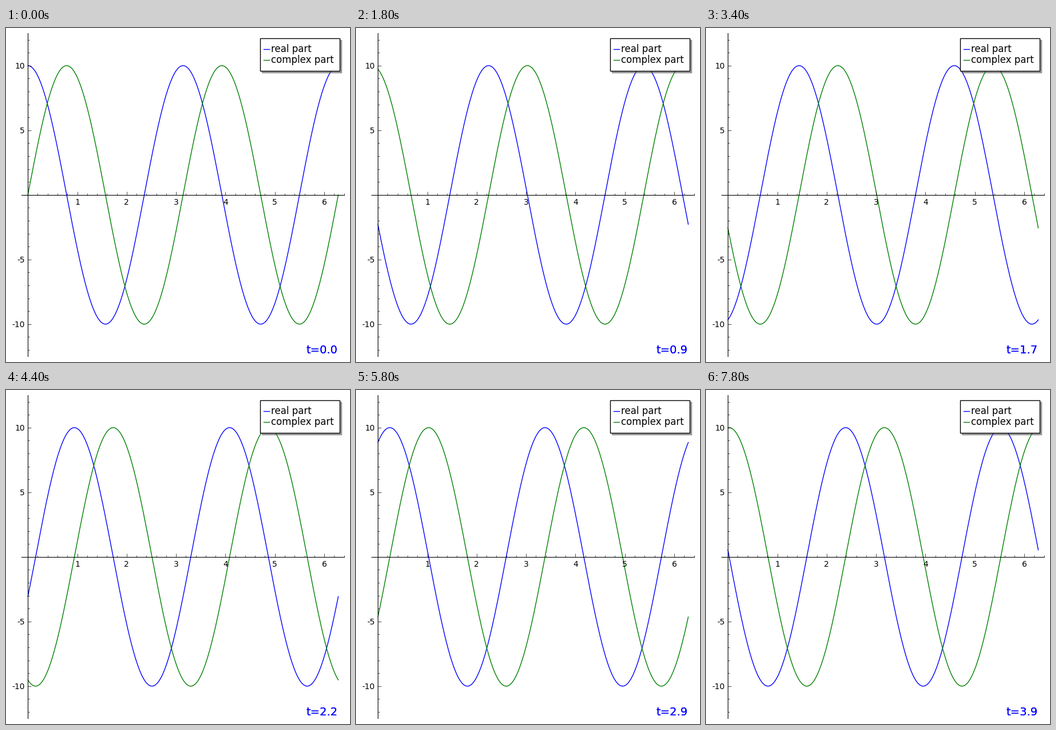
A matplotlib script for the animation above (8000 ms loop, 601 px wide and 584 px high).

```python
import numpy as np
import matplotlib.pyplot as plt
from matplotlib.animation import FuncAnimation
from matplotlib.lines import Line2D
from matplotlib.patches import Rectangle

W, H, DPI = 601, 584, 100
FRAMES, INTERVAL = 40, 200
BLUE, GREEN = (0, 0, 1), (0, 0.5, 0)

plt.rcParams.update({
    "font.family": "DejaVu Sans",
    "font.size": 10,
    "axes.unicode_minus": False,
    "axes.axisbelow": False,
})

fig = plt.figure(figsize=(W / DPI, H / DPI), dpi=DPI, facecolor="white")

# Plot area in pixels: left, top, width, height
LEFT, TOP, AW, AH = 27.35, 9.3, 564, 565
ax = fig.add_axes([LEFT / W, 1 - (TOP + AH) / H, AW / W, AH / H])
END = 2 * np.pi
ax.set_xlim(-0.02 * END, 1.02 * END)
ax.set_ylim(-12.5, 12.5)
ax.patch.set_visible(False)

for side in ("right", "top"):
    ax.spines[side].set_visible(False)
for side in ("left", "bottom"):
    ax.spines[side].set_position(("data", 0))
    ax.spines[side].set_linewidth(0.8)

ax.set_xticks(range(1, 7))
ax.set_xticks(np.arange(1, 33) / 5, minor=True)
ax.set_yticks([-10, -5, 5, 10])
ax.set_yticks(range(-12, 13), minor=True)
ax.tick_params(which="major", direction="in", length=4, width=0.5, pad=4)
ax.tick_params(which="minor", direction="in", length=2, width=0.5)
ax.tick_params(axis="x", pad=4.5)

x = np.linspace(0, END, 600)
real, = ax.plot([], [], color=BLUE, lw=1)
imag, = ax.plot([], [], color=GREEN, lw=1)

# Overlay in pixel coordinates, y pointing down
top = fig.add_axes([0, 0, 1, 1], zorder=5)
top.set_xlim(0, W)
top.set_ylim(H, 0)
top.axis("off")


def box(left, upper, **style):
    top.add_patch(Rectangle((left, upper), 139, 57, **style))


def entry(y, color, label):
    top.add_line(Line2D([450, 460], [y, y], color=color, lw=1))
    top.text(463, y + 5, label, size=12, va="baseline")


box(446.8, 20.8, fc="0.3", ec="0.3", lw=1, alpha=0.5)
box(444.1, 17.9, fc="white", ec="black", lw=1)
entry(36.9, BLUE, "real part")
entry(55.9, GREEN, "complex part")

# Two stacked copies give the clock its heavier edges
clocks = [top.text(552, 568.6, "", size=14, color=BLUE, ha="center",
                   va="baseline") for _ in range(2)]


def update(i):
    t = i / 10
    real.set_data(x, 10 * np.cos(2 * (x + t)))
    imag.set_data(x, 10 * np.sin(2 * (x + t)))
    for clock in clocks:
        clock.set_text(f"t={t:.1f}")
    return [real, imag, *clocks]


anim = FuncAnimation(fig, update, frames=FRAMES, interval=INTERVAL,
                     init_func=lambda: update(0), repeat=True, repeat_delay=0)
plt.show()
```
